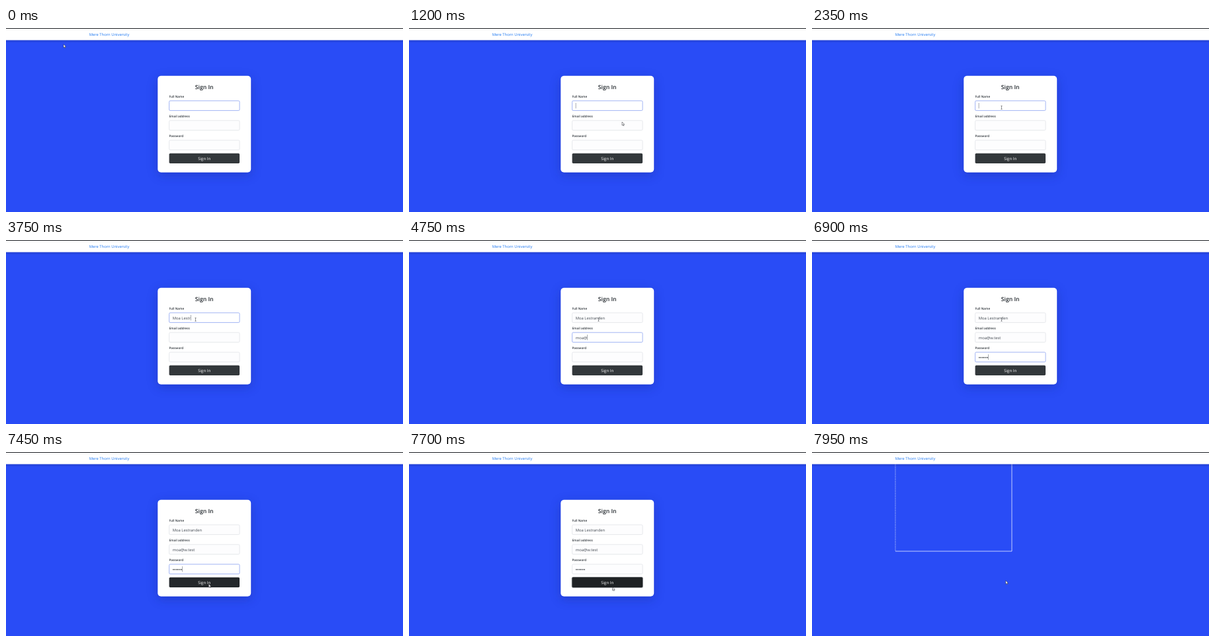
Animation, 600 px wide and 280 px high, one loop 8000 ms. Source, as an HTML page:

```html
<!DOCTYPE html>
<html lang="en">
<head>
<meta charset="utf-8">
<title>Sign in</title>
<style>
  html, body { margin: 0; width: 100%; height: 100%; overflow: hidden; background: #294cf6; }
  svg { display: block; width: 600px; height: 280px; }
  text { font-family: "Open Sans", "Noto Sans", sans-serif; white-space: pre; text-rendering: geometricPrecision; }
  .brand { font-size: 5.85px; fill: #1f78f0; }
  .title { font-size: 8.6px; font-weight: 600; fill: #1f252a; text-anchor: middle; }
  .label { font-size: 4.7px; font-weight: 600; fill: #2a3036; }
  .value { font-size: 5.85px; fill: #434a52; }
  .dots { letter-spacing: .22px; fill: #262b30; stroke: #262b30; stroke-width: .25; }
  .action { font-size: 6.1px; font-weight: 500; fill: #fff; text-anchor: middle; }
  .box { fill: #fdfdfe; stroke: #e0e2e7; stroke-width: .8; }
  .box.focus { fill: #fff; stroke: #8ba3f0; }
</style>
</head>
<body>
<svg viewBox="0 0 600 280">
  <defs>
    <linearGradient id="shade" x2="0" y2="1">
      <stop stop-color="#10206e" stop-opacity=".3"/>
      <stop offset="1" stop-color="#10206e" stop-opacity="0"/>
    </linearGradient>
    <filter id="soft" x="-30%" y="-30%" width="160%" height="160%">
      <feGaussianBlur stdDeviation="8"/>
    </filter>
  </defs>
  <rect width="600" height="280" fill="#294cf6"/>

  <g id="next">
    <path d="M302 18V151H126" fill="none" stroke="#fff" stroke-opacity=".8" stroke-width=".9"/>
    <path d="M126 18V151" stroke="#fff" stroke-opacity=".75" stroke-width=".8" stroke-dasharray="1.6 1"/>
  </g>

  <rect y="18" width="600" height="5" fill="url(#shade)"/>
  <rect width="600" height="18.5" fill="#fff"/>
  <rect width="600" height="1" fill="#1a1d22"/>
  <text class="brand" x="125.7" y="12.2">Mere Thorn University</text>

  <g id="form">
    <rect x="229" y="77" width="141.5" height="147" rx="5" fill="#14258c" opacity=".36" filter="url(#soft)"/>
    <rect x="229.3" y="72.8" width="140.9" height="147" rx="5" fill="#fff"/>
    <text class="title" x="299.7" y="93.4">Sign In</text>
    <g id="fields"></g>
    <rect id="ring" x="245.8" y="190" width="108" height="16.7" rx="2.2" fill="#343a40" opacity=".6"/>
    <rect id="button" x="246.6" y="190.8" width="106.4" height="15.1" rx="1.6"/>
    <text class="action" x="299.7" y="200.8">Sign In</text>
    <rect id="caret" width=".6" height="8.4" fill="#6d727c"/>
  </g>

  <path id="arrow" d="M0 0V5.2L1.2 4.1L2 5.9L2.9 5.5L2.1 3.8H3.7Z" fill="#fff" stroke="#24272c" stroke-width=".5" stroke-linejoin="round"/>
  <path id="beam" d="M-1.1 -2.4H1.1M0 -2.4V2.4M-1.1 2.4H1.1" fill="none" stroke="#3a3d42" stroke-width=".55"/>
</svg>
<script>
const LOOP = 8000, STEP = 50, BLINK = 255, LEFT = 251.8;
const CLICK = 7550, LEAVE = 7850;
const $ = id => document.getElementById(id);

function add(tag, attrs, content = "") {
  const el = document.createElementNS("http://www.w3.org/2000/svg", tag);
  for (const k in attrs) el.setAttribute(k, attrs[k]);
  el.textContent = content;
  $("fields").append(el);
  return el;
}

// Evenly timed key presses
const run = (start, gap, count) => Array.from({ length: count }, (_, i) => start + gap * i);

const fields = [
  { label: "Full Name", text: "Moa Lestranden", focus: -360,
    keys: [...run(2700, 200, 4), ...run(3500, 60, 10)] },
  { label: "Email address", text: "moa@w.test", focus: 4150,
    keys: [...run(4300, 150, 6), ...run(5900, 20, 4)] },
  { label: "Password", text: "••••••", focus: 6150, dots: true,
    keys: run(6300, 110, 6) }
];

fields.forEach((f, i) => {
  f.top = 110.8 + 30 * i;
  add("text", { class: "label", x: 246.4, y: f.top - 4.8 }, f.label);
  f.box = add("rect", { class: "box", x: 246.6, y: f.top, width: 106.4, height: 14.8, rx: 1.6 });
  f.out = add("text", { class: "value" + (f.dots ? " dots" : ""), x: LEFT, y: f.top + 9.9 });
});

// Pointer moves, each eased from wherever the last one ended
const home = [87, 24.7];
const moves = [
  { from: 50, to: 700, at: [322, 143] },
  { from: 1600, to: 1800, at: [171, 168] },
  { from: 1800, to: 2000, at: [286.5, 121] },
  { from: 7150, to: 7500, at: [307.5, 205.5] },
  { from: 7750, to: 7950, at: [292.8, 195.7] }
];

function pointer(t) {
  return moves.reduce((pos, m) => {
    const u = Math.min(1, Math.max(0, (t - m.from) / (m.to - m.from)));
    const e = u * u * (3 - 2 * u);
    return pos.map((p, i) => p + (m.at[i] - p) * e);
  }, home);
}

const show = (el, on) => el.setAttribute("visibility", on ? "visible" : "hidden");

function draw(t) {
  const active = t >= CLICK ? null : fields.filter(f => t >= f.focus).pop();
  for (const f of fields) {
    f.typed = f.keys.filter(k => k <= t);
    const text = f.text.slice(0, f.typed.length);
    if (f.out.textContent !== text) f.out.textContent = text;
    f.box.classList.toggle("focus", f === active);
  }

  const caret = $("caret");
  show(caret, false);
  if (active) {
    // Every key press restarts the blink
    const since = t - (active.typed.at(-1) ?? active.focus);
    show(caret, Math.floor(since / BLINK) % 2 === 0);
    const width = active.typed.length ? active.out.getComputedTextLength() : 0;
    caret.setAttribute("x", LEFT + width);
    caret.setAttribute("y", active.top + 3.2);
  }

  const [x, y] = pointer(t);
  const typing = t >= 2000 && t < 7200;
  show($("beam"), typing);
  show($("arrow"), !typing);
  $(typing ? "beam" : "arrow").setAttribute("transform", `translate(${x} ${y})`);

  const hover = t < LEAVE && y > 191;
  $("button").setAttribute("fill", t >= CLICK ? "#1f2224" : hover ? "#24282b" : "#33383b");
  $("ring").style.display = t >= CLICK ? "" : "none";
  $("form").style.display = t < LEAVE ? "" : "none";
  $("next").style.display = t < LEAVE ? "none" : "";
}

const start = performance.now();
function tick(now) {
  const t = Math.max(0, now - start) % LOOP;
  draw(Math.floor(t / STEP) * STEP);
  requestAnimationFrame(tick);
}
draw(0);
requestAnimationFrame(tick);
</script>
</body>
</html>
```
